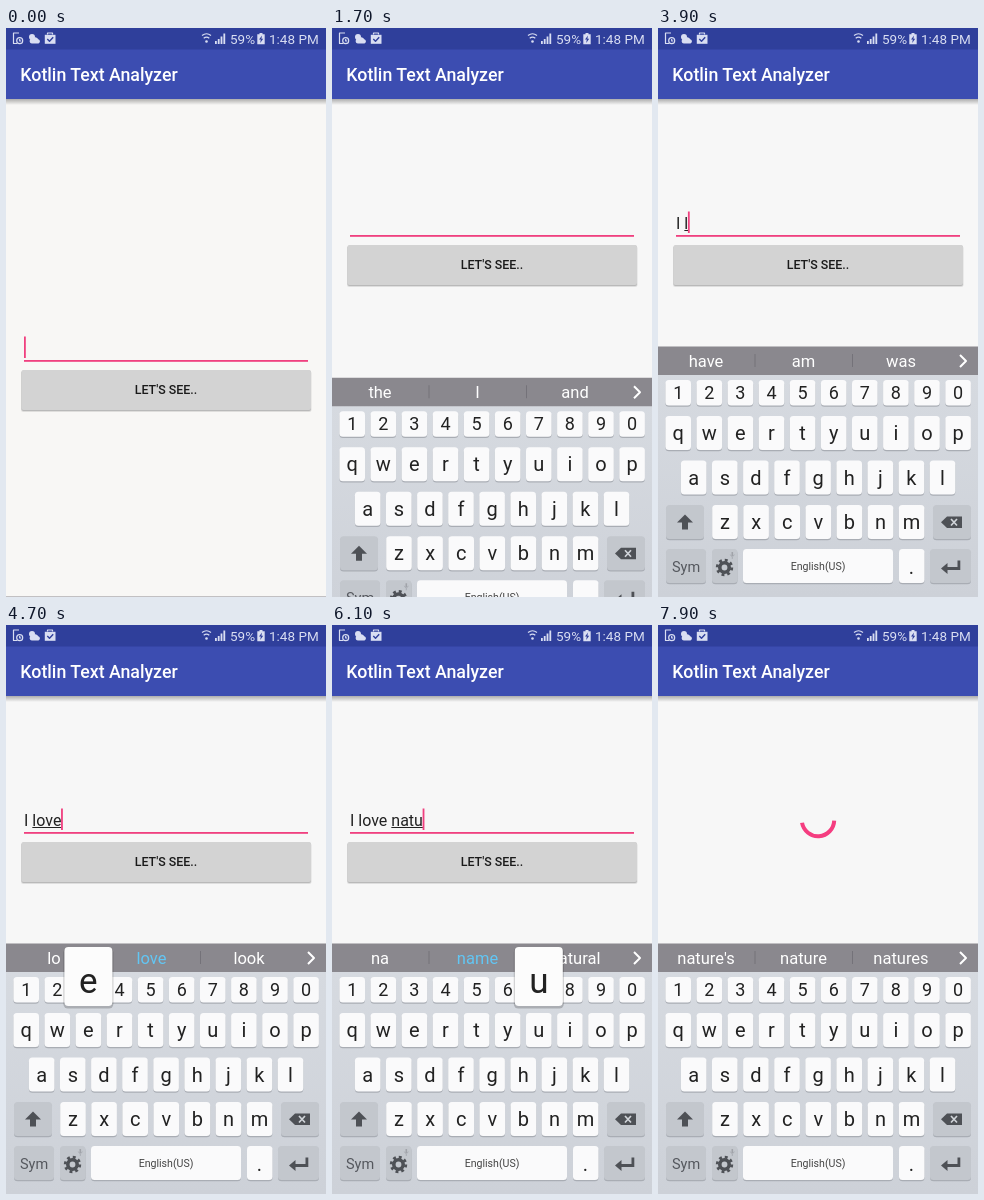
Write an HTML page that moves like this. It is 320 px wide and 569 px high and loops after 8 s.

```html
<!DOCTYPE html>
<html lang="en">
<head>
<meta charset="utf-8">
<title>Text Analyzer</title>
<style>
  html, body { margin: 0; width: 100%; height: 100%; overflow: hidden; background: #f8f7f5; }
  svg { display: block; width: 100%; height: 100%; }
  text { font-family: Roboto, "Open Sans", sans-serif; white-space: pre; }
  .mid { text-anchor: middle; }
  .line { fill: none; stroke-linejoin: round; }
</style>
</head>
<body>
<svg id="stage" viewBox="0 0 320 569">
  <defs>
    <linearGradient id="shade" x2="0" y2="1">
      <stop offset="0" stop-color="#000" stop-opacity=".3"/>
      <stop offset="1" stop-color="#000" stop-opacity="0"/>
    </linearGradient>
    <linearGradient id="board" x2="0" y2="1">
      <stop offset="0" stop-color="#d7dbe1"/>
      <stop offset="1" stop-color="#cdd1d8"/>
    </linearGradient>
  </defs>
  <rect id="page" width="320" height="569"/>

  <g id="form">
    <text id="done" x="18" y="325.5" font-size="16" fill="#222"/>
    <text id="typing" y="325.5" font-size="16" fill="#222"/>
    <rect id="under" y="327" height="1" fill="#222"/>
    <rect id="cursor" y="308.5" width="1.8" height="21.5" fill="#f0407f"/>
    <rect x="18" y="332" width="284" height="1.8" fill="#f0407f"/>
    <rect x="15" y="343" width="290.5" height="41" rx="2.5" fill="#000" opacity=".1"/>
    <rect x="15.5" y="342.5" width="289.5" height="40.5" rx="2" fill="#b9b9b9"/>
    <rect id="button" x="15.5" y="342" width="289.5" height="40" rx="2"/>
    <text class="mid" x="160" y="366.3" font-size="12.4" font-weight="500" fill="#1a1a1a">LET'S SEE..</text>
  </g>
  <path id="spinner" class="line" stroke="#f53d80" stroke-width="4"/>

  <rect y="71" width="320" height="6" fill="url(#shade)"/>
  <rect width="320" height="22" fill="#2f3f9b"/>
  <rect y="21.5" width="320" height="49.5" fill="#3c4db1"/>
  <text x="14.3" y="53" font-size="17.78" font-weight="500" fill="#fff">Kotlin Text Analyzer</text>

  <g fill="#d9def2" stroke="none">
    <text x="224" y="15.6" font-size="13.5">59%</text>
    <text x="263" y="15.6" font-size="13.5">1:48 PM</text>
    <path d="M253.5 5h3v1.3h2.2v10h-7.4v-10h2.2z"/>
    <path d="M256 7.5l-3 4h1.8l-.6 3.5 3-4.2h-1.8z" fill="#2f3f9b"/>
    <path d="M209 13h1.8v3h-1.8zM211.8 11h1.8v5h-1.8zM214.6 8.5h1.8v7.500h-1.8zM217.400 5.500h1.8v10.500h-1.8z"/>
    <circle cx="200.500" cy="13.500" r="1.300"/>
    <g class="line" stroke="#d9def2" stroke-width="1.2">
      <path d="M196 7.500q4.500-3.500 9 0M197.700 10.200q2.800-2.200 5.600 0"/>
      <path d="M13 5H7.500v10.500H11"/>
      <circle cx="13.700" cy="12.700" r="3"/>
      <path d="M13.700 11v2h1.500"/>
      <path d="M41.500 6.500v-1.500h5v1.500"/>
    </g>
    <circle cx="26" cy="9" r="3"/>
    <path d="M26 15.500a2.500 2.500 0 0 1 .3-5 3.600 3.600 0 0 1 6 .8 2.200 2.200 0 0 1 .2 4.200z"/>
    <path d="M38.800 6.800h10.700v9H38.800z"/>
    <path class="line" d="M41.300 11l2.200 2.200 3.700-4" stroke="#2f3f9b" stroke-width="1.400"/>
  </g>

  <g id="keyboard">
    <rect y="319" width="320" height="250" fill="url(#board)"/>
    <rect y="318.500" width="320" height="28.500" fill="#8a888e"/>
    <path d="M97 326v13M194.500 326v13" stroke="#747279"/>
    <path class="line" d="M302 327l6 6-6 6" stroke="#fff" stroke-width="2"/>
    <g id="hints" class="mid" font-size="16.500"></g>
    <g id="keys"></g>
    <g fill="#4e5156">
      <path d="M27 486.500l8 8h-5v7h-6v-7h-5z"/>
      <path d="M289 488.500h15v11.500h-15l-6-5.750z"/>
      <path class="line" d="M293 491l6 6.500m0-6.500l-6 6.500" stroke="#d0d4d9" stroke-width="1.700"/>
      <path d="M283 540.500l6.500-5.500v4h10v-6.500h2.800v9.500h-12.800v4z"/>
      <circle class="line" cx="66.500" cy="539.500" r="4.700" stroke="#4e5156" stroke-width="3.600"/>
      <circle class="line" cx="66.500" cy="539.500" r="7.300" stroke="#4e5156" stroke-width="2.800" stroke-dasharray="2.870 2.870"/>
      <path d="M73.500 524h1.600v4h-1.600z" fill="#a0a3a9"/>
      <path class="line" d="M72.300 526.500q2 4.500 4 0M74.300 529v2" stroke="#a0a3a9" stroke-width=".7"/>
    </g>
    <g id="popup">
      <rect x="-25" y="1" width="50" height="60.500" rx="4.500" fill="#000" opacity=".2"/>
      <rect x="-24" width="48" height="59" rx="4" fill="#fcfcfc"/>
      <text id="big" class="mid" y="45.500" font-size="35" fill="#222"/>
    </g>
  </g>
</svg>
<script>
const LOOP = 8000, STEP = 100, PITCH = 31.1;
const $ = id => document.getElementById(id);

function add(parent, tag, attrs, label = "") {
  const el = document.createElementNS("http://www.w3.org/2000/svg", tag);
  for (const name in attrs) el.setAttribute(name, attrs[name]);
  el.textContent = label;
  parent.append(el);
  return el;
}

const set = (id, attrs) => {
  for (const name in attrs) $(id).setAttribute(name, attrs[name]);
};
const show = (id, on) => set(id, { visibility: on ? "visible" : "hidden" });

function key(x, y, w, h, fill = "#fafafb") {
  add($("keys"), "rect", { x, y: y + 1.3, width: w, height: h, rx: 3.5, fill: "#a9adb4" });
  add($("keys"), "rect", { x, y, width: w, height: h, rx: 3.5, fill });
}

function label(text, x, y, size, fill = "#222") {
  add($("keys"), "text", { class: "mid", x, y, "font-size": size, fill }, text);
}

// Characters, first centre, top, height, font size
const rows = [
  ["1234567890", 20.2, 352, 25.5, 18],
  ["qwertyuiop", 20.2, 388, 34, 20],
  ["asdfghjkl", 35.7, 432.5, 34, 20],
  ["zxcvbnm", 67, 477, 34, 20]
];
const spots = {};
for (const [chars, first, top, h, size] of rows) {
  [...chars].forEach((c, i) => {
    const x = first + i * PITCH;
    key(x - 12.8, top, 25.6, h);
    label(c, x, top + h / 2 + size * 0.35, size);
    spots[c] = [x, top - 66];
  });
}
const DIM = "#c3c7cd";
key(8, 477, 38, 34, DIM);
key(275, 477, 38, 34, DIM);
key(8, 521, 40, 34, DIM);
key(54, 521, 25.5, 34, DIM);
key(85, 521, 150, 34);
key(241, 521, 25.5, 34);
key(272, 521, 41, 34, DIM);
label("Sym", 28, 543.5, 14.5, "#55585e");
label("English(US)", 160, 542, 10.6, "#444");
label(".", 253.5, 546, 20);

const hints = [48, 145.5, 243].map(x => add($("hints"), "text", { x, y: 338.7 }));

// Time, settled text, composing text, pressed key, suggestions (* marks the pick)
const START = "the,I,and", AFTER_I = "have,am,was", LO = "lo,*love,look";
const LOVE = "love,loved,lover", NEXT = "you,it,the", NA = "na,*name,natural";
const NATU = "natu,*nature,natural", END = "nature's,nature,natures";
const events = [
  [0, "", "", "", START],
  [2500, "", "", "i", START],
  [2700, "", "i", "i", START],
  [2800, "", "i", "", "i,*I,in"],
  [3100, "I ", "", "", AFTER_I],
  [3700, "I ", "", "l", AFTER_I],
  [3900, "I ", "l", "", AFTER_I],
  [4100, "I ", "l", "o", "l,*love,like"],
  [4200, "I ", "lo", "o", "l,*love,like"],
  [4300, "I ", "lo", "", LO],
  [4500, "I ", "lo", "v", LO],
  [4600, "I ", "lov", "v", LO],
  [4700, "I ", "love", "e", LO],
  [4800, "I ", "love", "", LOVE],
  [5200, "I love ", "", "", NEXT],
  [5400, "I love ", "", "n", NEXT],
  [5500, "I love ", "n", "", NEXT],
  [5800, "I love ", "n", "a", "n,*my,no"],
  [5900, "I love ", "na", "a", "n,*my,no"],
  [6000, "I love ", "nat", "t", NA],
  [6100, "I love ", "natu", "u", NA],
  [6200, "I love ", "natu", "", NATU],
  [6400, "I love ", "natu", "r", NATU],
  [6500, "I love ", "natur", "", NATU],
  [6600, "I love ", "natur", "e", NATU],
  [6700, "I love ", "nature", "", END]
];

const OPEN = 1500, RESIZE = 1600, SETTLED = 1900, PRESS = 7600, BUSY = 7700;
const easeOut = x => 1 - (1 - Math.min(1, Math.max(0, x))) ** 3;

function stateAt(t) {
  let now = events[0], edit = t < SETTLED ? 0 : SETTLED;
  for (const e of events) {
    if (e[0] > t) break;
    if (e[1] + e[2] !== now[1] + now[2]) edit = e[0];
    now = e;
  }
  return { now, edit };
}

function drawField(done, typing, cursorOn) {
  $("done").textContent = done;
  $("typing").textContent = typing;
  const x = 18 + (done ? $("done").getComputedTextLength() : 0);
  const w = typing ? $("typing").getComputedTextLength() : 0;
  set("typing", { x });
  set("under", { x, width: w });
  set("cursor", { x: x + w - (x + w > 18 ? 0.3 : 0) });
  $("cursor").style.opacity = cursorOn ? 1 : 0;
}

function drawSpinner(t) {
  const from = 2 + 0.23 * (t - BUSY - 200);
  const sweep = Math.max(10, 256 * easeOut((t - BUSY) / 667));
  const point = deg => {
    const a = deg * Math.PI / 180;
    return `${160 + 16.2 * Math.cos(a)} ${195 + 16.2 * Math.sin(a)}`;
  };
  set("spinner", {
    d: `M${point(from)}A16.2 16.2 0 ${sweep > 180 ? 1 : 0} 1 ${point(from + sweep)}`
  });
}

function draw(t) {
  const { now: [, done, typing, pressed, words], edit } = stateAt(t);
  const busy = t >= BUSY;

  set("page", { fill: t < RESIZE ? "#f8f7f5" : "#f7f7f7" });
  set("form", { transform: `translate(0 ${t < RESIZE ? 0 : -125})` });
  show("form", !busy);
  set("button", { fill: t >= PRESS ? "#c2c2c3" : "#d3d3d3" });
  drawField(done, typing, Math.floor((t - edit) / 500) % 2 === 0);

  show("spinner", busy);
  if (busy) drawSpinner(t);

  const drop = 250 * (1 - easeOut((t - OPEN) / 400));
  set("keyboard", { transform: `translate(0 ${drop})` });
  words.split(",").forEach((word, i) => {
    const picked = word[0] === "*";
    hints[i].textContent = picked ? word.slice(1) : word;
    hints[i].setAttribute("fill", picked ? "#62c6f4" : "#fff");
  });

  show("popup", pressed);
  if (pressed) {
    $("big").textContent = pressed;
    set("popup", { transform: `translate(${spots[pressed]})` });
  }
}

function tick(ms) {
  const t = ms % LOOP;
  draw(t - t % STEP);
  requestAnimationFrame(tick);
}
draw(0);
requestAnimationFrame(tick);
</script>
</body>
</html>
```
